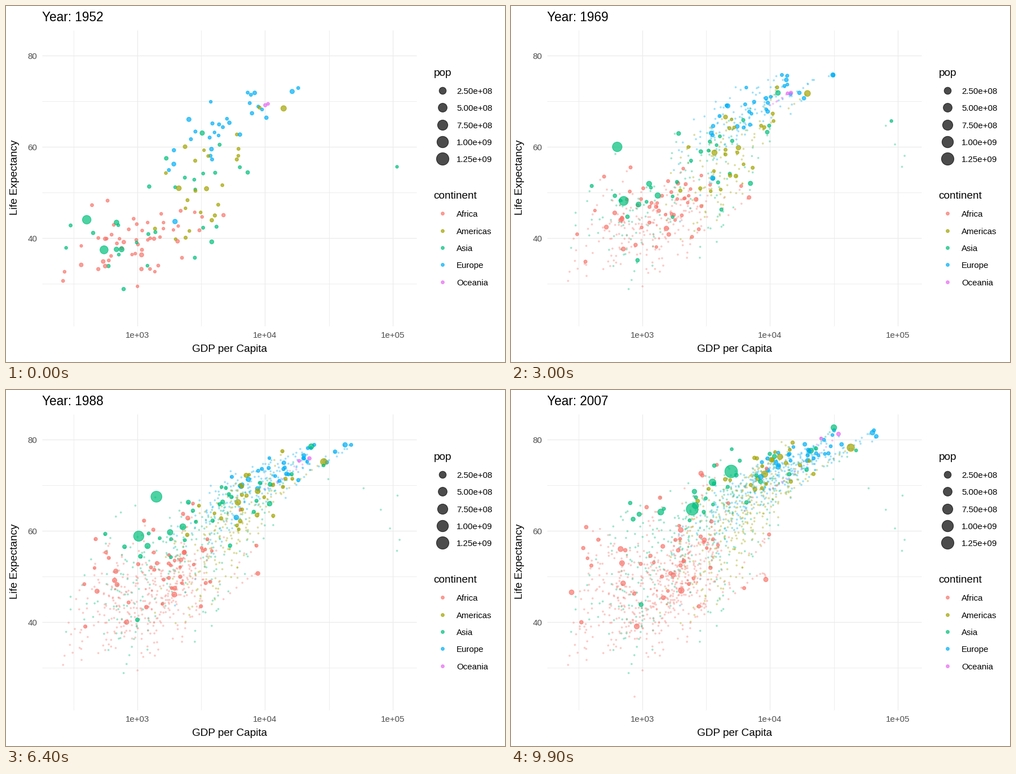
Recreate the animation shown at these times as a matplotlib script. Size 885 by 632 pixels, loop 10 s.

```python
import matplotlib.pyplot as plt
import numpy as np
from matplotlib.animation import FuncAnimation
from matplotlib.colors import to_rgba

W, H, DPI = 885, 632, 100
PX = 72 / DPI
FRAMES, STEP, STATES = 100, 9, 12
GREY, GRID = "#4D4D4D", "#EBEBEB"
MAX_POP = 1318.0

plt.rcParams["font.family"] = "Liberation Sans"
rng = np.random.default_rng(41)

# start and end mean/spread of log10 income and life span, their correlation,
# mid-period bulge, typical population (millions) and its growth
RULES = {
    "Africa": dict(color="#F8766D", n=52, start=(2.97, .27, 39.2, 4.6, .3),
                   end=(3.19, .42, 55, 9, .55), bulge=(.09, 3.2), pop=9, growth=3.9),
    "Americas": dict(color="#A3A500", n=25, start=(3.51, .21, 53.3, 8.6, .75),
                     end=(3.93, .25, 73.6, 4, .6), bulge=(.06, 1.6), pop=9, growth=2.8),
    "Asia": dict(color="#00BF7D", n=33, start=(3.25, .38, 47, 8.6, .45),
                 end=(3.76, .52, 71, 6.5, .75), bulge=(.05, 2.2), pop=18, growth=2.8),
    "Europe": dict(color="#00B0F6", n=30, start=(3.72, .24, 65.2, 5.2, .8),
                   end=(4.35, .25, 77.8, 2.8, .85), bulge=(.08, 1.2), pop=9.5, growth=1.35),
    "Oceania": dict(color="#E76BF3", n=2, start=(4, .02, 69, .2, 0),
                    end=(4.4, .05, 80, 1, 0), bulge=(.0, -1.2), pop=10, growth=2.2),
}

# outstanding tracks: continent, final population, evenly spaced (income, life)
TRACKS = [
    ("Africa", 65, [(781, 39.1), (278, 46.5)]),
    ("Africa", 76, [(362, 34.1), (691, 52.9)]),
    ("Africa", 135, [(1077, 36.3), (2014, 46.9)]),
    ("Africa", 44, [(4725, 45), (9270, 49.3)]),
    ("Africa", 9, [(493, 40), (863, 46.2)]),
    ("Americas", 190, [(2109, 50.9), (9066, 72.4)]),
    ("Americas", 109, [(3478, 50.8), (11978, 76.2)]),
    ("Americas", 301, [(13990, 68.4), (24500, 73.8), (42952, 78.2)]),
    ("Asia", 32, [(779, 28.8), (975, 43.8)]),
    ("Asia", 150, [(684, 37.5), (1391, 64.1)]),
    ("Asia", 1318, [(400, 44), (576, 50.5), (488, 44.5), (613, 58.4),
                    (677, 63.1), (741, 64), (962, 65.5), (1379, 67.3),
                    (1656, 68.7), (2289, 70.4), (3119, 72), (4959, 73)]),
    ("Asia", 1110, [(547, 37.4), (665, 44), (760, 52), (930, 58),
                    (1400, 61.5), (2452, 64.7)]),
    ("Asia", 224, [(750, 37.5), (3541, 70.6)]),
    ("Asia", 127, [(3217, 63), (13500, 72.8), (24000, 78.9), (31656, 82.6)]),
    ("Asia", 2.5, [(108382, 55.6), (113523, 58), (95458, 60.5), (80895, 64.6),
                   (109348, 67.7), (59265, 69.3), (31354, 71.3), (28118, 74.2),
                   (34933, 75.2), (40301, 76.2), (35110, 76.9), (47307, 77.6)]),
    ("Asia", 169, [(685, 43.4), (2606, 65.5)]),
    ("Europe", 71, [(1969, 43.6), (8458, 71.8)]),
    ("Oceania", 20, [(10040, 69.1), (34435, 81.2)]),
    ("Oceania", 4, [(10557, 69.4), (25185, 80.2)]),
]
CRISIS = 4  # the track with a sudden collapse of life span

U = np.linspace(0, 1, STATES)


def px_x(log_income):
    return 233.2 + 226.2 * (log_income - 3)


def px_y(life):
    return 87.8 + 8.1 * (80 - life)


def diameter(size):
    """Width in pixels of a dot of the given size, without its outline."""
    return 3.556 * size + 1.175


def dot_size(pop):
    return 1 + 5 * np.sqrt(np.maximum(pop, 0) / MAX_POP)


def area(size):
    return (diameter(size) * PX) ** 2


def track_path(rule, points):
    knots = np.linspace(0, 1, len(points))
    income, life = np.array(points, float).T
    path = np.column_stack([np.interp(U, knots, np.log10(income)),
                            np.interp(U, knots, life)])
    if len(points) == 2:
        path += np.sin(np.pi * U)[:, None] * rule["bulge"]
    return path


def place(params, z):
    mx, sx, my, sy, r = params
    return np.array([mx + sx * z[0], my + sy * (r * z[0] + np.sqrt(1 - r * r) * z[1])])


def random_path(rule):
    z = np.clip(rng.normal(size=2), -2.1, 2.1)
    keep = np.array([.78, .5])
    z_end = np.clip(keep * z + np.sqrt(1 - keep ** 2) * rng.normal(size=2), -2, 1.9)
    a, b = place(rule["start"], z), place(rule["end"], z_end)
    a[1] = np.clip(a[1], 30, 72.7)
    b[1] = np.clip(b[1], 39.6, 82)
    path = a + U[:, None] * (b - a) + np.sin(np.pi * U)[:, None] * rule["bulge"]
    path += rng.normal(size=path.shape) * (.035, .35)
    path[:, 1] = np.minimum(path[:, 1], 73 + 9 * U)
    return path


def build():
    paths, pops, colors = [], [], []

    def add(rule, path, pop):
        paths.append(path)
        pops.append(pop * rule["growth"] ** (U - 1))
        colors.append(rule["color"])

    left = {name: rule["n"] for name, rule in RULES.items()}
    for name, _, _ in TRACKS:
        left[name] -= 1
    for name, rule in RULES.items():
        for _ in range(left[name]):
            pop = np.clip(rule["pop"] * np.exp(rng.normal() * 1.05), .3, 82)
            add(rule, random_path(rule), pop)
    order = rng.permutation(len(paths))
    paths[:] = [paths[i] for i in order]
    pops[:] = [pops[i] for i in order]
    colors[:] = [colors[i] for i in order]
    for i, (name, pop, points) in enumerate(TRACKS):
        path = track_path(RULES[name], points)
        if i == CRISIS:
            path[8:10, 1] -= (23.3, 10.5)
        add(RULES[name], path, pop)
    paths = np.array(paths)
    xy = np.stack([px_x(paths[..., 0]), px_y(paths[..., 1])], axis=-1)
    return xy.swapaxes(0, 1), dot_size(np.array(pops).T), colors


def rgba(colors, alpha):
    return np.array([to_rgba(c, alpha) for c in colors])


POS, SIZE, COLORS = build()
N = len(COLORS)

fig = plt.figure(figsize=(W / DPI, H / DPI), dpi=DPI, facecolor="white")
ax = fig.add_axes([0, 0, 1, 1])
ax.set(xlim=(0, W), ylim=(H, 0))
ax.axis("off")


def text(x, y, s, px, color="black", **kw):
    return ax.text(x, y, s, fontsize=px * PX, color=color, **kw)


def grid(values, to_px, width, vertical):
    for v in values:
        p = to_px(v)
        xs, ys = ([p, p], [42.5, 568]) if vertical else ([64, 728], [p, p])
        ax.plot(xs, ys, color=GRID, lw=width * PX, solid_capstyle="butt", zorder=0)


grid((2.5, 3.5, 4.5), px_x, .9, True)
grid((30, 50, 70), px_y, .9, False)
grid((3, 4, 5), px_x, 1.3, True)
grid((40, 60, 80), px_y, 1.3, False)

for power in (3, 4, 5):
    text(px_x(power), 589, f"1e+0{power}", 15, GREY, ha="center")
for life in (40, 60, 80):
    text(55.5, px_y(life) + 5.8, str(life), 15, GREY, ha="right")
text(396, 614, "GDP per Capita", 19, ha="center")
text(24.5, 304, "Life Expectancy", 19, rotation=90, ha="right", va="center",
     rotation_mode="default")
title = text(63.5, 27, "", 22.6)


def key(y, label, color, size):
    ax.scatter([774.3], [y], s=area(size), color=[to_rgba(color, .7)], lw=1.1 * PX)
    text(799, y + 6.2, label, 15)


text(758.5, 124, "pop", 19)
for i in range(5):
    pop = 250 * (i + 1)
    key(149.7 + 30.4 * i, f"{pop * 1e6:.2e}", "black", dot_size(pop))
text(758.5, 342, "continent", 19)
for i, (name, rule) in enumerate(RULES.items()):
    key(368.3 + 30.3 * i, name, rule["color"], 1.25)

trail_xy = POS.reshape(-1, 2)
trail_rgba = np.tile(rgba(COLORS, .3), (STATES, 1))
live_rgba = rgba(COLORS, .7)
trail = ax.scatter([], [], s=area(.45), lw=.9 * PX, zorder=2)
live = ax.scatter(*POS[0].T, s=area(SIZE[0]), color=live_rgba, lw=1.1 * PX, zorder=3)


def update(k):
    i = min(k // STEP, STATES - 2)
    f = k / STEP - i
    live.set_offsets(POS[i] + f * (POS[i + 1] - POS[i]))
    live.set_sizes(area(SIZE[i] + f * (SIZE[i + 1] - SIZE[i])))
    past = N * -(-k // STEP)
    trail.set_offsets(trail_xy[:past])
    trail.set_color(trail_rgba[:past])
    title.set_text(f"Year: {round(1952 + k * 5 / STEP)}")
    return trail, live, title


anim = FuncAnimation(fig, update, frames=FRAMES, interval=100,
                     init_func=lambda: update(0), repeat=True, repeat_delay=0)
plt.show()
```
